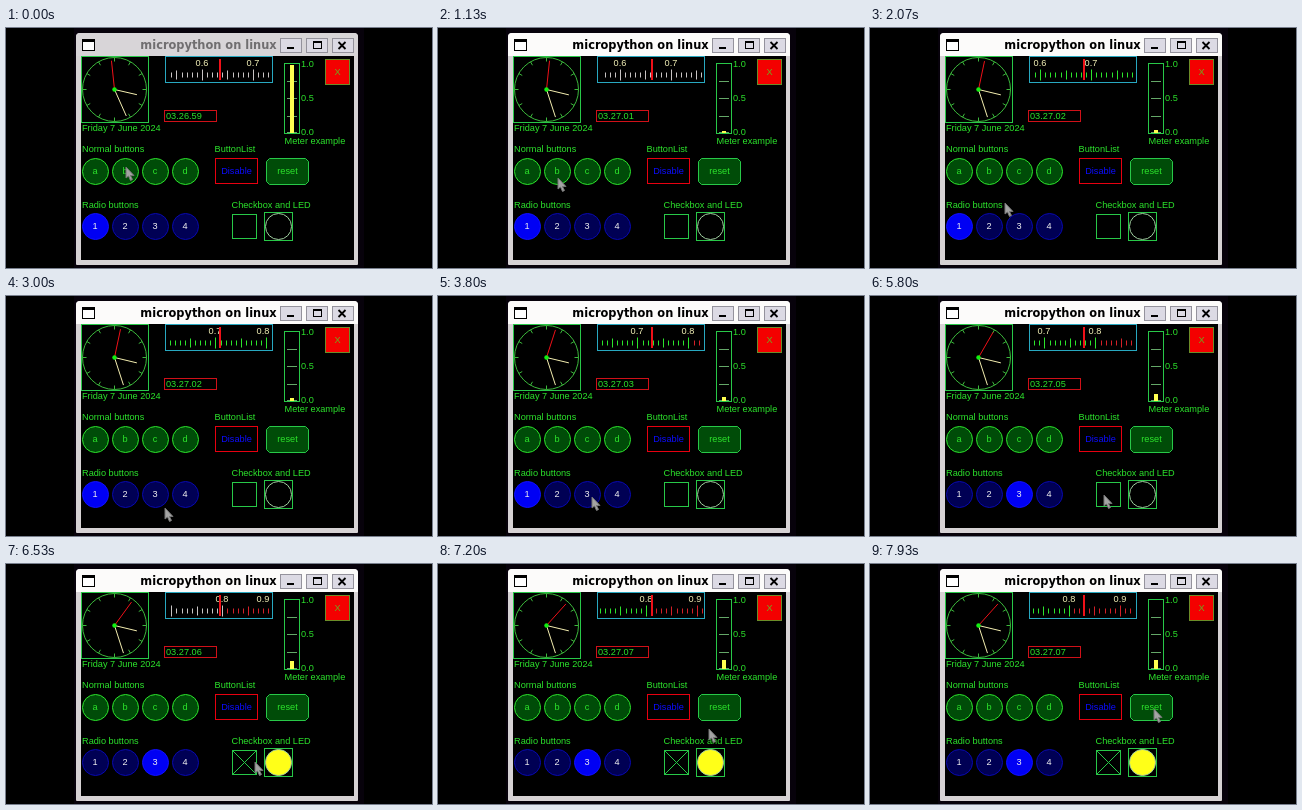
Animation of 426x240 px, one loop 8000 ms. Source, as an HTML page with a canvas:

```html
<!DOCTYPE html>
<html lang="en">
<head>
<meta charset="utf-8">
<title>micropython on linux</title>
<style>
  html, body { margin: 0; width: 100%; height: 100%; overflow: hidden; background: #000; }
  canvas { display: block; width: 426px; height: 240px; }
</style>
</head>
<body>
<canvas id="stage" width="426" height="240"></canvas>
<script>
const ctx = document.getElementById('stage').getContext('2d');
const LOOP = 8000;
const GREEN = '#2ce42c', DARK_GREEN = '#004c08', EDGE = '#28c848', DIAL = '#3cb83c';
const CYAN = '#28a8c0', RED = '#f01018', YELLOW = '#ffff18', PALE = '#c8c4c4';
const UI_FONT = '9.2px "Liberation Sans", Arial, sans-serif';

// Cursor waypoints: time, x, y
const cursorPath = [
  [0, 120, 139], [600, 120, 140], [1130, 120, 150], [1600, 120, 151],
  [2800, 159, 212], [3100, 159, 212], [3800, 154, 201], [4700, 154, 201],
  [5600, 234, 199], [6200, 234, 199], [6530, 249, 198], [7600, 284, 145], [8000, 284, 145]
];

function cursorAt(t) {
  const i = Math.max(1, cursorPath.findIndex(p => p[0] >= t));
  const [t0, x0, y0] = cursorPath[i - 1], [t1, x1, y1] = cursorPath[i];
  const k = (t - t0) / (t1 - t0);
  return [Math.round(x0 + (x1 - x0) * k), Math.round(y0 + (y1 - y0) * k)];
}

function fill(x, y, w, h, color) {
  ctx.fillStyle = color;
  ctx.fillRect(x, y, w, h);
}

// Outline covering the pixels from (x0, y0) to (x1, y1) inclusive
function frame(x0, y0, x1, y1, color) {
  ctx.lineWidth = 1;
  ctx.strokeStyle = color;
  ctx.strokeRect(x0 + .5, y0 + .5, x1 - x0, y1 - y0);
}

function line(x0, y0, x1, y1, color, width = 1) {
  ctx.lineWidth = width;
  ctx.strokeStyle = color;
  ctx.beginPath();
  ctx.moveTo(x0, y0);
  ctx.lineTo(x1, y1);
  ctx.stroke();
}

function circle(x, y, r, color, background) {
  ctx.beginPath();
  ctx.arc(x, y, r, 0, Math.PI * 2);
  if (background) { ctx.fillStyle = background; ctx.fill(); }
  if (color) { ctx.lineWidth = 1; ctx.strokeStyle = color; ctx.stroke(); }
}

function polygon(points, color, outline) {
  ctx.beginPath();
  points.forEach(([x, y]) => ctx.lineTo(x, y));
  ctx.closePath();
  ctx.fillStyle = color;
  ctx.fill();
  ctx.lineWidth = 1;
  ctx.strokeStyle = outline;
  ctx.stroke();
}

function text(s, x, y, color = GREEN, align = 'left', font = UI_FONT) {
  ctx.font = font;
  ctx.textAlign = align;
  ctx.fillStyle = color;
  ctx.fillText(s, x, y);
}

function drawWindow(focused) {
  fill(68, 0, 290, 240, '#07020b');
  ctx.fillStyle = '#d6d2d4';
  ctx.beginPath();
  ctx.roundRect(70, 5, 282, 232, [4, 4, 1, 1]);
  ctx.fill();
  ctx.fillStyle = focused ? '#fcfbfa' : '#d8d5d8';
  ctx.beginPath();
  ctx.roundRect(70, 5, 282, 23, [4, 4, 0, 0]);
  ctx.fill();
  fill(75, 28, 273, 204, '#000');

  fill(76, 11, 13, 12, '#000');
  fill(77, 14, 11, 8, '#fff');
  text('micropython on linux', 202.5, 21, focused ? '#000' : '#706e70', 'center',
    'bold 11.4px "DejaVu Sans", sans-serif');

  for (const x of [274, 300, 326]) {
    fill(x, 10, 22, 15, '#dcdae4');
    frame(x, 10, x + 21, 24, '#94929c');
  }
  fill(281, 19, 7, 2, '#000');
  frame(307, 13, 315, 20, '#000');
  fill(307, 13, 9, 2, '#000');
  line(332.5, 14, 339.5, 21, '#000', 1.8);
  line(339.5, 14, 332.5, 21, '#000', 1.8);
}

function drawClock(seconds) {
  const cx = 108.5, cy = 61.5;
  const ray = (turn, from, to, color) => {
    const a = turn * Math.PI * 2, dx = Math.sin(a), dy = -Math.cos(a);
    line(cx + dx * from, cy + dy * from, cx + dx * to, cy + dy * to, color);
  };
  frame(75, 28, 142, 94, EDGE);
  circle(cx, cy, 32, DIAL);
  for (let i = 0; i < 12; i++) ray(i / 12, 28, 32, DIAL);
  const minutes = 26 + Math.floor(seconds / 60);
  ray((3 + minutes / 60) / 12, 0, 23, '#f4eeb0');
  ray(minutes / 60, 0, 29, '#f4eeb0');
  ray(seconds / 60, 0, 29, RED);
  circle(cx, cy, 2.2, null, '#10f010');
}

function drawScale(t, seconds) {
  const origin = 247 - t * .0125;
  const plain = t < 2070 || seconds === 66;
  frame(159, 28, 266, 54, CYAN);
  for (let n = 50; n <= 100; n++) {
    const x = Math.round(origin + (n - 70) * 5.1);
    if (x < 162 || x > 268) continue;
    const major = n % 10 === 0;
    const half = major ? 5 : n % 5 === 0 ? 4 : 2;
    const color = n > 80 ? '#d42028' : plain ? PALE : GREEN;
    if (x < 265) line(x + .5, 46.5 - half, x + .5, 47.5 + half, color);
    if (major && x > 166) text((n / 100).toFixed(1), Math.min(x, 257), 38, '#f4f2b8', 'center');
  }
  fill(213, 31, 2, 21, RED);
}

function drawMeter(seconds) {
  frame(278, 35, 293, 105, EDGE);
  for (const y of [53, 70, 88, 104]) line(281, y + .5, 291, y + .5, '#64a868');
  const height = Math.round(1 + seconds % 60 / 60 * 68);
  fill(284, 105 - height, 4, height, '#ffff50');
  text('1.0', 295, 39);
  text('0.5', 295, 73);
  text('0.0', 295, 107);
  text('Meter example', 278.5, 115.5);
}

function drawControls(selected, checked) {
  text('Normal buttons', 76, 124);
  text('ButtonList', 208.5, 124);
  text('Radio buttons', 76, 179.5);
  text('Checkbox and LED', 225.5, 179.5);

  for (let i = 0; i < 4; i++) {
    const x = 89.5 + i * 30;
    circle(x, 143.5, 13, GREEN, DARK_GREEN);
    text('abcd'[i], x - .5, 146, GREEN, 'center');
    const active = i + 1 === selected;
    circle(x, 198.5, 13, active ? '#1010ff' : '#0808b0', active ? '#0000f4' : '#000054');
    text(i + 1, x - .5, 201, '#f0f0f0', 'center');
  }

  frame(209, 130, 251, 155, '#e80010');
  text('Disable', 230.5, 146, '#0c0cff', 'center');

  polygon([[263.5, 130.5], [299.5, 130.5], [302.5, 133.5], [302.5, 153.5],
    [299.5, 156.5], [263.5, 156.5], [260.5, 153.5], [260.5, 133.5]], DARK_GREEN, EDGE);
  text('reset', 281.5, 146, GREEN, 'center');

  frame(226, 186, 250, 210, EDGE);
  if (checked) {
    line(227, 187, 250, 210, EDGE);
    line(250, 187, 227, 210, EDGE);
  }
  frame(258, 184, 286, 212, EDGE);
  circle(272.5, 198.5, 13, '#a0d0a0', checked ? YELLOW : '#000');

  fill(319, 31, 25, 26, '#f40000');
  frame(319, 31, 343, 56, '#6c8c28');
  text('X', 331.5, 47, '#68b020', 'center');
}

function drawCursor(x, y) {
  const shape = [[0, 0], [0, 11], [2.5, 9], [4.5, 13.5], [6.5, 12.5], [4.5, 8.5], [8, 8.5]];
  polygon(shape.map(([dx, dy]) => [x + dx, y + dy]), '#a4a4a4', '#747474');
}

function draw(t) {
  const seconds = 60 + Math.floor((t - 70) / 1000);
  fill(0, 0, 426, 240, '#000');
  drawWindow(t >= 500);
  drawClock(seconds);
  drawScale(t, seconds);
  drawMeter(seconds);

  const two = n => String(n).padStart(2, '0');
  text('Friday 7 June 2024', 76, 103);
  frame(158, 82, 210, 93, '#d01018');
  text(`03.${26 + Math.floor(seconds / 60)}.${two(seconds % 60)}`, 160, 90.5);

  drawControls(t < 4300 ? 1 : 3, t >= 6200);
  drawCursor(...cursorAt(t));
}

function tick() {
  draw(performance.now() % LOOP);
  requestAnimationFrame(tick);
}
tick();
</script>
</body>
</html>
```
